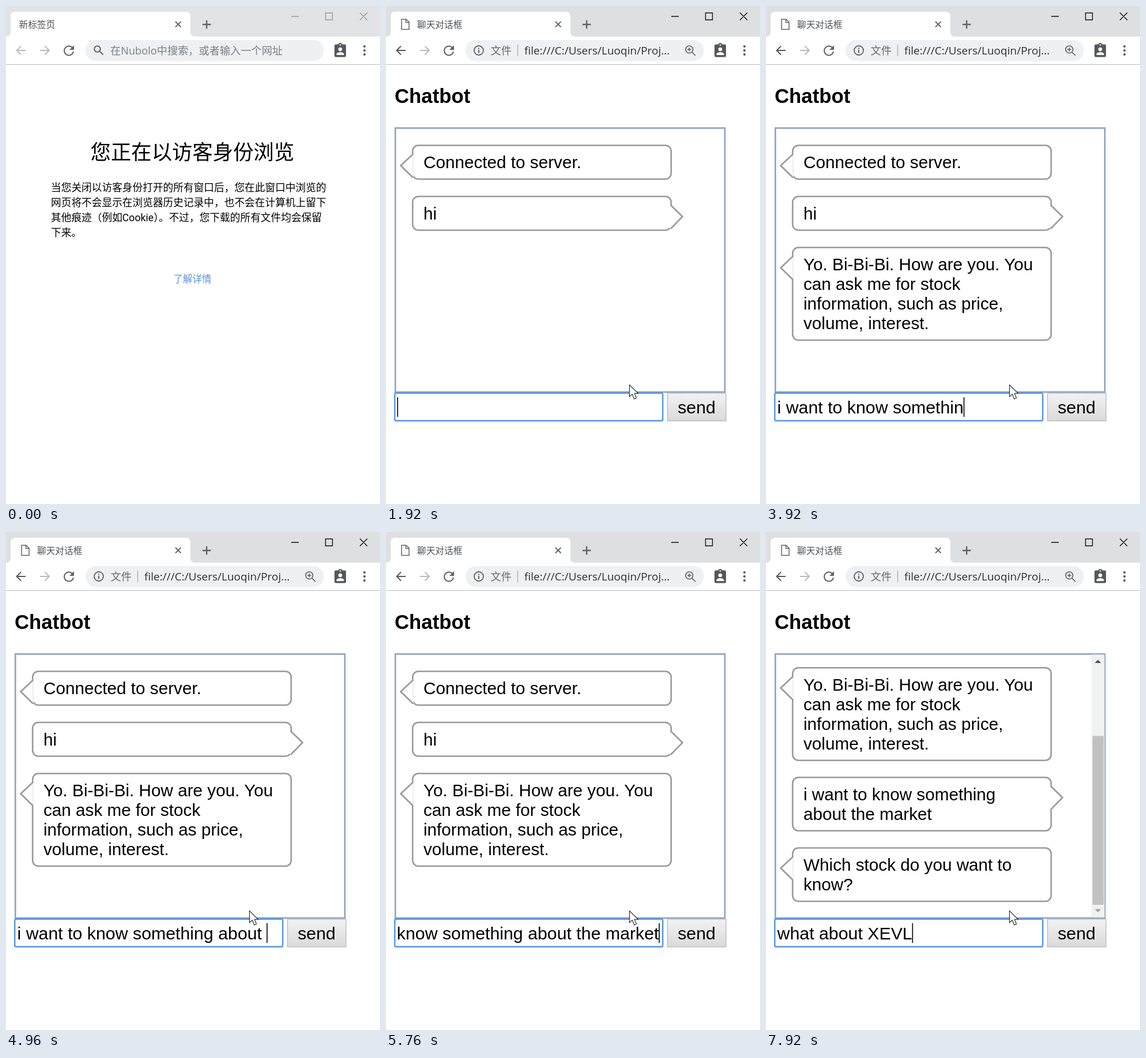
Write an HTML page that moves like this. It is 649 px wide and 863 px high and loops after 8000 ms.

```html
<!DOCTYPE html>
<html lang="zh-CN">
<head>
<meta charset="utf-8">
<title>Chatbot</title>
<style>
  html, body { margin: 0; width: 100%; height: 100%; overflow: hidden; background: #fff; }
  svg { display: block; }
  text { white-space: pre; font-family: "Liberation Sans", Arial, sans-serif; }
  .ui { font-family: "Open Sans", "Noto Sans CJK SC", "Noto Sans CJK", sans-serif; }
  .page { font-family: Roboto, "Noto Sans CJK SC", "Noto Sans CJK", sans-serif; }
  .line { fill: none; stroke: #5f6368; stroke-width: 2; }
  .bubble { fill: #fff; stroke: #999; stroke-width: 2.6; }
</style>
</head>
<body>
<svg width="649" height="863" viewBox="0 0 649 863">
  <defs>
    <linearGradient id="face" x2="0" y2="1"><stop stop-color="#f2f2f2"/><stop offset="1" stop-color="#dadada"/></linearGradient>
    <clipPath id="logClip"><path d="M17 212.500H587.500V668H17Z"/></clipPath>
    <clipPath id="inputClip"><path d="M18 672H477V718H18Z"/></clipPath>
  </defs>

  <!-- browser frame -->
  <path id="strip" d="M0 0H649V53H0Z"/>
  <path d="M0 53Q8 53 8 45V18Q8 10 16 10H312Q320 10 320 18V45Q320 53 328 53Z" fill="#fff"/>
  <path d="M0 101.500H649" stroke="#bdbdbd"/>
  <path class="line" d="M294 27L303.500 36.500M303.500 27L294 36.500" style="stroke-width:1.8"/>
  <path class="line" d="M341 32H355.500M348.200 24.800V39.300" style="stroke-width:2.4"/>
  <path id="controls" fill="none" stroke-width="1.4" d="M495 18H508M554.500 12H566.500V24H554.500ZM614 11.500L627 24.500M627 11.500L614 24.500"/>
  <path id="back" class="line" d="M34 77H18.500M26 69.500L18.500 77L26 84.500"/>
  <path class="line" d="M59 77H75M67.500 69.500L75 77L67.500 84.500" style="stroke:#b9bbbe"/>
  <path class="line" d="M115.500 72.500A8 8 0 1 0 117 79"/>
  <path d="M118 68V76H110Z" fill="#5f6368"/>
  <rect x="138" y="59" width="413.500" height="36.500" rx="18.200" fill="#eef0f1"/>
  <rect x="570" y="66.500" width="20" height="22" rx="2.500" fill="#54585c"/>
  <circle cx="580" cy="67.500" r="3.500" fill="#54585c"/>
  <g fill="#fff"><circle cx="580" cy="67.500" r="1.200"/><circle cx="580" cy="75" r="3.300"/><path d="M573.500 85V83Q575 80 580 80T586.500 83V85Z"/></g>
  <g fill="#54585c"><circle cx="622" cy="70" r="2.100"/><circle cx="622" cy="77" r="2.100"/><circle cx="622" cy="84" r="2.100"/></g>

  <g id="guest">
    <text class="ui" x="22.500" y="38" font-size="15.700" fill="#4c4f53">新标签页</text>
    <g class="line"><circle cx="158.500" cy="74.500" r="5.200"/><path d="M162.500 78.500L168.500 84.500"/></g>
    <text class="ui" x="181" y="84" font-size="18.200" fill="#7b7f83">在Nubolo中搜索，或者输入一个网址</text>
    <text class="page" x="146.500" y="265.500" font-size="35.400" font-weight="300">您正在以访客身份浏览</text>
    <g id="notice" font-size="17.700"></g>
    <text class="page" x="290.500" y="479.300" font-size="16.500" fill="#5a92d8">了解详情</text>
  </g>

  <g id="chat">
    <path class="line" d="M27 23H35L40 28V40.500H27ZM34.500 23V28.500H40" style="stroke-width:1.500"/>
    <text class="ui" x="54" y="38" font-size="15.700" fill="#4c4f53">聊天对话框</text>
    <circle class="line" cx="161" cy="77" r="8" style="stroke-width:1.800"/>
    <path class="line" d="M161 76V81.500M161 72.500V74.500"/>
    <text class="ui" x="181.500" y="84" font-size="18.200" fill="#66696d">文件</text>
    <path d="M228.500 67V87" stroke="#a9acaf" stroke-width="1.300"/>
    <text class="ui" x="240" y="83.500" font-size="19" fill="#2c2f33">file:///C:/Users/Luoqin/Proj...</text>
    <g class="line" style="stroke-width:1.700"><circle cx="526.300" cy="75.300" r="6.300"/><path d="M531 80L537 86M523 75.300H529.600M526.300 72V78.600"/></g>

    <text x="15" y="168" font-size="34.750" font-weight="bold">Chatbot</text>
    <rect x="16.200" y="211.500" width="571.800" height="457.500" fill="none" stroke="#8ca2c0" stroke-width="2.600"/>
    <g clip-path="url(#logClip)">
      <g id="log" font-size="29.700"></g>
      <g id="bar">
        <path d="M565 212H588V668H565Z" fill="#f0f1f1"/>
        <rect id="thumb" x="566.500" width="19.500" fill="#c1c1c1"/>
        <path d="M570.500 227L576 221.500L581.500 227Z" fill="#505050"/>
        <path d="M570.500 653.500L576 659L581.500 653.500Z" fill="#a3a3a3"/>
      </g>
    </g>
    <rect x="15.200" y="670.700" width="465" height="48" rx="2.500" fill="#fff" stroke="#5596e8" stroke-width="2.500"/>
    <g clip-path="url(#inputClip)">
      <text id="typed" y="705.500" font-size="30.300"></text>
      <path id="caret" d="M0 678V712" stroke="#000" stroke-width="1.600"/>
    </g>
    <rect x="488.500" y="671" width="101.500" height="48" fill="url(#face)" stroke="#b9b9b9" stroke-width="1.300"/>
    <text x="539" y="705.500" font-size="30.300" text-anchor="middle">send</text>
    <path id="beam" d="M-6 -11H-2L0 -9L2 -11H6M0 -9V9M-6 11H-2L0 9L2 11H6" fill="none" stroke="#000" stroke-width="1.700"/>
    <path id="arrow" d="M0.500 0.500V21L5.300 16.700L8.800 25L12.600 23.300L9.200 15.300H15.500Z" fill="#fff" stroke="#222" stroke-width="1.100"/>
  </g>
</svg>
<script>
const LOOP = 8000, STEP = 80, OPEN = 1040;
const $ = id => document.getElementById(id);
const set = (id, attrs) => { for (const k in attrs) $(id).setAttribute(k, attrs[k]); };
const show = (el, on) => el.style.display = on ? '' : 'none';

$('notice').innerHTML = [
  '当您关闭以访客身份打开的所有窗口后，您在此窗口中浏览的',
  '网页将不会显示在浏览器历史记录中，也不会在计算机上留下',
  '其他痕迹（例如Cookie）。不过，您下载的所有文件均会保留',
  '下来。'
].map((s, i) => `<text class="page" x="78" y="${320.5 + i * 26}">${s}</text>`).join('');

// Messages: time of appearance, top edge, sent by the user, lines
const messages = [
  [1040, 241.5, 0, ['Connected to server.']],
  [1920, 330, 1, ['hi']],
  [2240, 418.5, 0, ['Yo. Bi-Bi-Bi. How are you. You', 'can ask me for stock', 'information, such as price,', 'volume, interest.']],
  [5840, 608.5, 1, ['i want to know something', 'about the market']],
  [6320, 730.8, 0, ['Which stock do you want to', 'know?']]
];
$('log').innerHTML = messages.map(([, top, mine, lines]) => {
  const tail = mine ? 'M494 15L514.500 35L494 56' : 'M47 15L25.500 35L47 56';
  const text = lines.map((s, i) => `<text x="65" y="${39.5 + i * 34}">${s}</text>`).join('');
  return `<g transform="translate(0 ${top})">
    <rect class="bubble" x="46.200" width="448.600" height="${58.5 + (lines.length - 1) * 34}" rx="10"/>
    <path d="${mine ? 'M492 16H498V55H492Z' : 'M44 16H48V55H44Z'}" fill="#fff"/>
    <path class="bubble" d="${tail}"/>
    ${mine ? '' : '<path d="M47 17V54" stroke="#ddd"/>'}${text}</g>`;
}).join('');
const bubbles = [...$('log').children];

// All keystrokes in one run, with the times at which given counts are reached
const script = 'hi' + 'i want to know something about the market' + 'what about XEVL';
const keys = [
  [1440, 0], [1680, 2], [2400, 2], [2960, 12], [3120, 12], [3280, 14], [4160, 30], [4320, 32],
  [4480, 32], [4560, 33], [4960, 33], [5520, 40], [5600, 41], [5680, 43], [6320, 43], [6640, 47],
  [6800, 47], [6960, 49], [7040, 49], [7360, 53], [7440, 53], [7520, 54], [7600, 54], [7920, 58]
];
function typedCount(t) {
  const i = keys.findIndex(k => k[0] > t);
  if (i === 0) return 0;
  if (i < 0) return script.length;
  const [t0, n0] = keys[i - 1], [t1, n1] = keys[i];
  return Math.floor(n0 + (n1 - n0) * (t - t0) / (t1 - t0) + 1e-6);
}

function drawInput(t) {
  const count = typedCount(t);
  const sent = t >= 5840 ? 43 : t >= 1920 ? 2 : 0;
  $('typed').textContent = script.slice(sent, count);
  const width = count > sent ? $('typed').getComputedTextLength() : 0;
  const x = Math.min(19.6, 473.5 - width);
  set('typed', { x });
  set('caret', { transform: `translate(${x + width + 0.6} 0)` });
  let last = t;
  while (last > OPEN && typedCount(last - STEP) === count) last -= STEP;
  show($('caret'), (t - last) % 960 < 480);
}

function drawLog(t) {
  bubbles.forEach((b, i) => show(b, t >= messages[i][0]));
  const scroll = t >= 6320 ? 183.3 : t >= 5840 ? 61 : 0;
  const height = 410 * 454 / (453 + scroll);
  set('log', { transform: `translate(0 ${-scroll})` });
  set('thumb', { y: 646 - height, height });
  show($('bar'), scroll > 0);
}

function drawMouse(t) {
  const p = Math.min(1, Math.max(0, (t - 1120) / 320));
  const x = 454 - 32 * p, y = 675 - 19 * p, over = y > 670;
  set('beam', { transform: `translate(${x} ${y})` });
  set('arrow', { transform: `translate(${x} ${y})` });
  show($('beam'), over);
  show($('arrow'), !over);
}

function draw() {
  const t = Math.floor(performance.now() % LOOP / STEP) * STEP;
  const open = t >= OPEN;
  show($('guest'), !open);
  show($('chat'), open);
  set('strip', { fill: open ? '#dedfe1' : '#e1e3e7' });
  set('controls', { stroke: open ? '#111' : '#999' });
  $('back').style.stroke = open ? '#54585c' : '#b9bbbe';
  if (open) {
    drawLog(t);
    drawInput(t);
    drawMouse(t);
  }
  requestAnimationFrame(draw);
}
draw();
</script>
</body>
</html>
```
